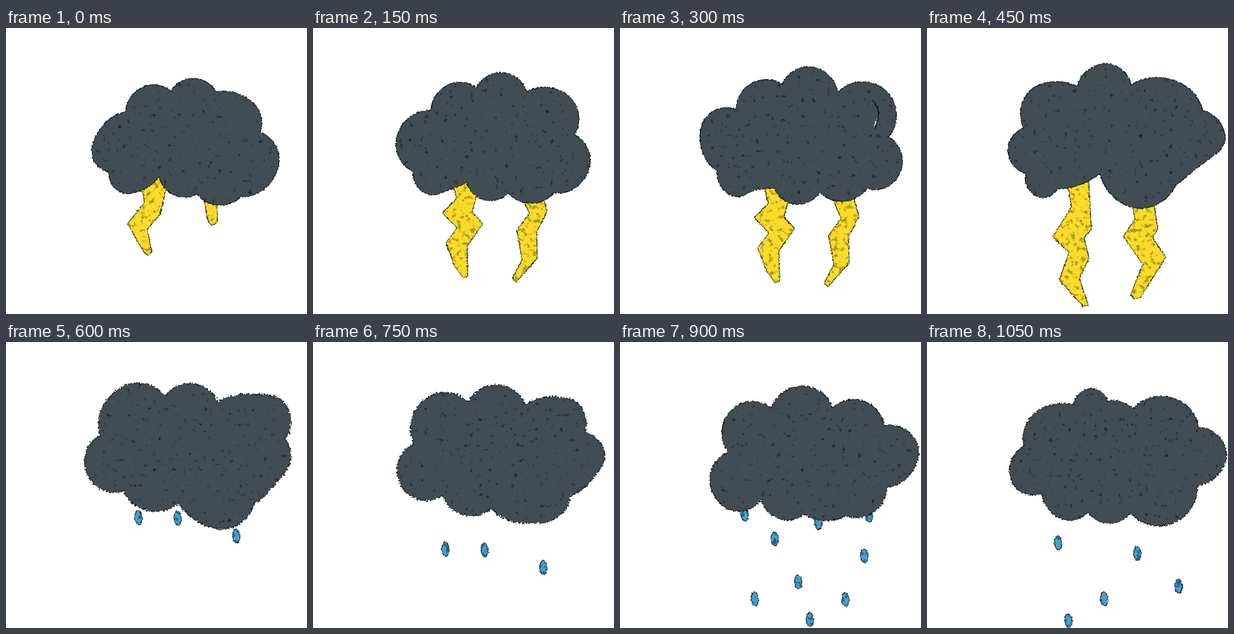
An HTML page that plays this animation: 498 px wide and 472 px high, repeating every 1200 ms.

```html
<!DOCTYPE html>
<html lang="en">
<head>
<meta charset="utf-8">
<title>Storm cloud</title>
<style>
  html, body { margin: 0; width: 100%; height: 100%; overflow: hidden; background: #fff; }
  svg { display: block; width: 498px; height: 472px; }
  .pose { opacity: 0; }
  .cloud, .bolt, .drop { stroke: #11130f; stroke-width: 1.2; stroke-linejoin: round; }
  .cloud { fill: #414d53; }
  .bolt { fill: #f9dc29; }
  .drop { fill: #46a2d0; }
  .crack { fill: none; stroke: #080a0b; stroke-width: 1.5; }
  .gap { fill: #fff; }
</style>
</head>
<body>
<svg id="stage" viewBox="0 0 498 472"></svg>
<script>
const STEP = 150, FALL = 52;
const stage = document.getElementById('stage');

// Ragged edge plus grain: noise above the cut shows in the given rgb colour.
function chalk(id, { edge = 4, freq, cut, gain, rgb, seed }) {
  const [r, g, b] = rgb.map(v => v / 255);
  return `<filter id="${id}" filterUnits="userSpaceOnUse" x="0" y="0" width="498" height="472"
      color-interpolation-filters="sRGB">
    <feTurbulence type="fractalNoise" baseFrequency=".32" numOctaves="2" seed="${seed}"/>
    <feDisplacementMap in="SourceGraphic" scale="${edge}" xChannelSelector="R" yChannelSelector="G" result="shape"/>
    <feTurbulence type="fractalNoise" baseFrequency="${freq}" numOctaves="4" seed="${seed + 20}"/>
    <feColorMatrix values="0 0 0 0 ${r}  0 0 0 0 ${g}  0 0 0 0 ${b}  ${gain} 0 0 0 ${-gain * cut}"/>
    <feComposite in2="shape" operator="in" result="specks"/>
    <feMerge><feMergeNode in="shape"/><feMergeNode in="specks"/></feMerge>
  </filter>`;
}

const parse = text => text.split(' ').map(p => p.split(',').map(Number));
const sub = (a, b) => [a[0] - b[0], a[1] - b[1]];
const unit = v => { const n = Math.hypot(...v); return [v[0] / n, v[1] / n]; };

// Tangent at b of the circle through a, b and c.
function tangent(a, b, c) {
  const u = sub(b, a), v = sub(c, b);
  const m = u[0] ** 2 + u[1] ** 2, n = v[0] ** 2 + v[1] ** 2;
  return unit([u[0] / m + v[0] / n, u[1] / m + v[1] / n]);
}

function mirror(t, a, b) {
  const d = unit(sub(b, a)), k = 2 * (t[0] * d[0] + t[1] * d[1]);
  return [k * d[0] - t[0], k * d[1] - t[1]];
}

// Lobes are parted by "/": a cusp, then one or two points the round edge runs through.
function cloudPath(text) {
  const lobes = text.split('/').map(parse);
  let d = `M${lobes[0][0]}`;
  lobes.forEach((lobe, i) => {
    const pts = [...lobe, lobes[(i + 1) % lobes.length][0]];
    const last = pts.length - 1;
    const dirs = pts.map((p, j) => j && j < last ? tangent(pts[j - 1], p, pts[j + 1]) : null);
    dirs[0] = mirror(dirs[1], pts[0], pts[1]);
    dirs[last] = mirror(dirs[last - 1], pts[last - 1], pts[last]);
    for (let j = 0; j < last; j++) {
      const a = pts[j], b = pts[j + 1], s = dirs[j], e = dirs[j + 1];
      const k = Math.hypot(...sub(b, a)) * 0.36;
      d += `C${a[0] + s[0] * k},${a[1] + s[1] * k} ${b[0] - e[0] * k},${b[1] - e[1] * k} ${b}`;
    }
  });
  return d + 'Z';
}

// Outline halfway between two clouds with the same lobes.
function between(a, b) {
  const other = b.match(/\d+/g);
  let i = 0;
  return a.replace(/\d+/g, n => (Number(n) + Number(other[i++])) / 2);
}

const bolt = points => `<polygon class="bolt" points="${points}"/>`;
const drop = ([x, y]) =>
  `<ellipse class="drop" cx="${x}" cy="${y}" rx="6" ry="11.5" transform="rotate(-4 ${x} ${y})"/>`;

function pose({ cloud, bolts = [], shift = 0, drops = '', fall = 0, rough = 4, extra = '' }, i) {
  const rain = drops ? parse(drops).map(([x, y]) => drop([x, y + fall])) : [];
  return `<g class="pose">
    ${chalk(`cloud${i}`, { edge: rough, freq: 0.12, cut: 0.68, gain: 6, rgb: [32, 39, 43], seed: i + 1 })}
    ${chalk(`bolt${i}`, { freq: 0.13, cut: 0.54, gain: 5, rgb: [165, 146, 30], seed: i + 4 })}
    ${chalk(`drop${i}`, { freq: 0.15, cut: 0.53, gain: 9, rgb: [36, 98, 132], seed: i + 7 })}
    <g filter="url(#bolt${i})"><g transform="translate(${shift} ${shift})">${bolts.map(bolt).join('')}</g></g>
    <g filter="url(#drop${i})">${rain.join('')}</g>
    <g filter="url(#cloud${i})"><path class="cloud" d="${cloudPath(cloud)}"/>${extra}</g>
  </g>`;
}

const strike = {
  cloud: '170,238 147,222 158,164/198,138 238,94/273,104 310,83/347,105 385,109 416,132/' +
    '421,172 446,194 440,252/388,279 350,292/316,274 290,279/253,245 226,267 190,271',
  bolts: [
    '230,248 226,268 229,288 201,323 229,371 235,375 241,370 234,332 255,307 266,262 262,245',
    '326,278 335,321 341,326 350,320 349,284'
  ]
};
const flash = {
  cloud: '161,236 135,200 153,138/192,134 225,88/268,93 313,64/360,106 412,90 452,120/' +
    '444,180 467,215 447,259/409,265 365,286/330,271 297,291/255,264 226,267 190,278',
  bolts: [
    '238,258 245,290 222,313 246,338 228,363 242,400 256,420 264,418 263,368 289,331 271,312 280,280 270,262',
    '350,278 366,314 345,342 354,390 338,421 344,427 379,388 378,345 395,311 386,276'
  ],
  extra: '<path class="crack" d="M418,119Q436,139 421,167"/><path class="gap" d="M426,149L420,167L421,157Z"/>'
};
const peak = {
  cloud: '164,240 134,203/160,165 168,106 222,89/249,96 305,60/338,94 400,84 440,106/' +
    '456,136 493,175 440,236/411,260 345,297 308,278/286,240 255,258/216,266 190,280',
  bolts: [
    '232,255 239,295 208,345 235,370 219,416 258,459 267,458 252,413 268,380 260,346 272,332 267,245',
    '339,288 344,315 325,344 357,390 337,440 343,447 353,445 395,378 373,346 382,332 375,288'
  ]
};
const drizzle = {
  cloud: '194,246 150,238 131,187/155,154 170,92 225,68/263,90 310,69/350,98 410,86 458,98/' +
    '462,160 471,190 445,235/410,268 388,299/355,309 318,297/285,266 240,279',
  drops: '219,290 284,291 381,320',
  rough: 8
};
const shower = {
  cloud: '234,260 190,279 150,215/179,182 175,125 220,98/250,109 306,73/352,109 390,95 420,107/' +
    '437,138 493,172 480,218/442,240 412,285/373,287 340,295/305,284 268,293',
  drops: '206,284 328,298 412,286 256,325 404,353 295,396 223,424 373,425 314,458',
  rough: 6
};
const clearing = {
  cloud: '190,250 150,243 140,195/160,172 175,120 215,102/243,103 272,77/299,98 320,98/' +
    '341,110 390,90 435,110/449,141 495,180 480,220/447,237 420,292 370,302/337,282 303,299/' +
    '266,281 240,294 200,275',
  drops: '217,332 348,349 416,403 293,424 234,460',
  rough: 6
};

const poses = [
  strike,
  { cloud: between(strike.cloud, flash.cloud), bolts: flash.bolts, shift: -8 },
  flash,
  peak,
  drizzle,
  { ...drizzle, cloud: between(drizzle.cloud, shower.cloud), fall: FALL },
  shower,
  clearing
];
stage.innerHTML = poses.map(pose).join('');

const loop = STEP * poses.length;
stage.querySelectorAll('.pose').forEach((el, i) => el.animate([
  { opacity: 1, offset: 0, easing: 'step-end' },
  { opacity: 0, offset: 1 / poses.length },
  { opacity: 0, offset: 1 }
], { duration: loop, delay: i * STEP - loop, iterations: Infinity }));
</script>
</body>
</html>
```
